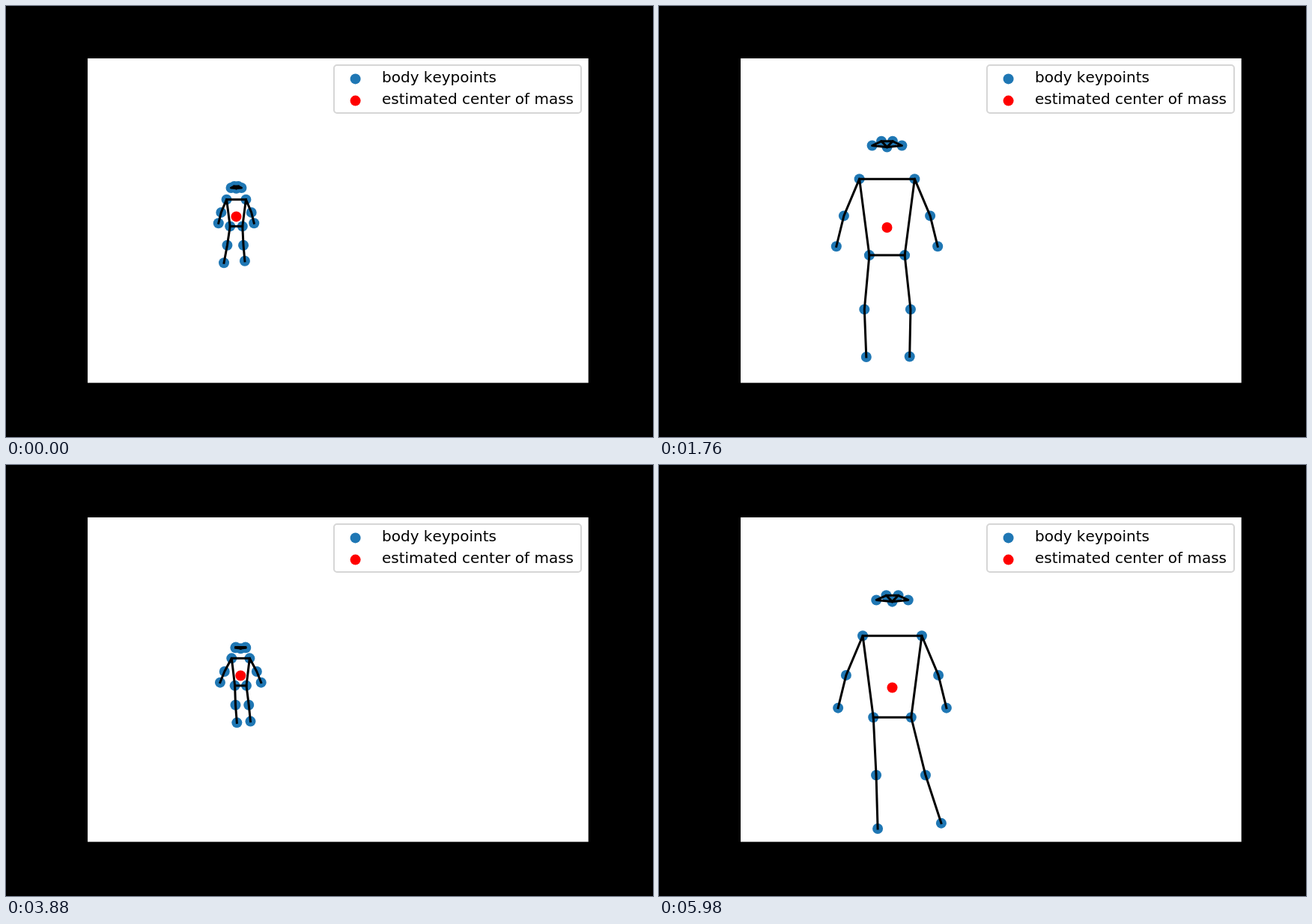
Write an HTML page with a canvas that moves like this. It is 864x576 px and loops after 6 s.

```html
<!DOCTYPE html>
<html lang="en">
<head>
<meta charset="utf-8">
<title>Body keypoints and center of mass</title>
<style>
  html, body { margin: 0; width: 100%; height: 100%; overflow: hidden; background: #000; }
  canvas { display: block; }
</style>
</head>
<body>
<canvas id="stage" width="864" height="576"></canvas>
<script>
const ctx = document.getElementById('stage').getContext('2d');
const LOOP = 6000, STEP = 20, GAIT = 1000;
const BLUE = '#1f77b4', RED = '#ff0000';

// The walk: time, center of mass x, body height.
const path = [
  [0, 307, 101], [660, 310, 145], [1760, 304, 288], [2200, 397, 283],
  [2540, 332, 225], [3140, 311, 149], [4050, 314, 99], [4640, 319, 125],
  [5580, 316, 233], [5790, 336, 272], [5980, 311, 308]
];

const mix = (a, b, u) => a + (b - a) * u;
const ease = (t, from, to) => {
  const u = Math.min(1, Math.max(0, (t - from) / (to - from)));
  return u * u * (3 - 2 * u);
};

function slope(i, k) {
  const a = path[Math.max(0, i - 1)], b = path[Math.min(path.length - 1, i + 1)];
  return (b[k] - a[k]) / (b[0] - a[0]);
}

function bodyAt(t) {
  let i = 0;
  while (i < path.length - 2 && t >= path[i + 1][0]) i++;
  const a = path[i], b = path[i + 1], d = b[0] - a[0], u = (t - a[0]) / d;
  const value = (k) => mix(a[k], b[k], u * u * (3 - 2 * u)) +
    d * u * (1 - u) * ((1 - u) * slope(i, k) - u * slope(i + 1, k));
  const h = value(2);
  return { x: value(1) + 0.5, y: 273.5 + 0.078 * h, h };
}

// Joints around the center of mass, measured in body heights.
function jointsAt(t, body) {
  const front = 1 - ease(t, 1950, 2330) + ease(t, 3850, 4250);
  const facing = 2 * front - 1;
  const profile = Math.sqrt(1 - facing * facing);
  const swing = Math.cos(2 * Math.PI * t / GAIT);
  const lean = mix(-0.025, 0.075, t / LOOP);

  const place = (x, y) => [body.x + x * body.h, body.y + y * body.h];
  // reach spreads the limbs fore and aft when seen from the side
  const half = (side) => {
    const joint = (x, y, reach = 0, shift = 0) =>
      place(side * (x * facing + reach * profile) + shift, y);
    return {
      ear: joint(0.069, mix(-0.36, -0.38, front)),
      eye: joint(mix(0.065, 0.026, front), mix(-0.368, -0.4, front)),
      shoulder: joint(0.128, -0.225, 0.03),
      elbow: joint(0.2, -0.054, -0.06),
      wrist: joint(0.235, 0.088, -0.15),
      hip: joint(0.082, 0.129, 0.02),
      knee: joint(0.107, 0.38, 0.07, lean / 2),
      ankle: joint(0.098 + 0.04 * swing, 0.6 - side * facing * 0.012 * swing, 0.14, lean)
    };
  };
  return { nose: place(0, mix(-0.352, -0.373, front)), sides: [half(-1), half(1)] };
}

function dot(x, y, color) {
  ctx.fillStyle = color;
  ctx.beginPath();
  ctx.arc(x, y, 7, 0, 2 * Math.PI);
  ctx.fill();
}

function line(...points) {
  ctx.beginPath();
  points.forEach((p) => ctx.lineTo(...p));
  ctx.stroke();
}

function drawBody(t) {
  const body = bodyAt(t);
  const { nose, sides } = jointsAt(t, body);
  const [left, right] = sides;

  [nose, ...sides.flatMap(Object.values)].forEach(([x, y]) => dot(x, y, BLUE));
  dot(body.x, body.y, RED);

  ctx.strokeStyle = '#000';
  ctx.lineWidth = 3;
  ctx.lineCap = 'square';
  ctx.lineJoin = 'round';
  for (const part of ['eye', 'shoulder', 'hip']) line(left[part], right[part]);
  for (const s of sides) {
    line(nose, s.eye, s.ear, nose);
    line(s.wrist, s.elbow, s.shoulder, s.hip, s.knee, s.ankle);
  }
}

function drawLegend() {
  ctx.strokeStyle = '#d6d6d6';
  ctx.lineWidth = 2;
  ctx.beginPath();
  ctx.roundRect(438, 79, 330, 64, 4);
  ctx.stroke();
  ctx.font = '20px "DejaVu Sans", sans-serif';
  ctx.fontKerning = 'none';
  [['body keypoints', BLUE], ['estimated center of mass', RED]].forEach(([label, color], i) => {
    dot(466.6, 97.4 + 29.2 * i, color);
    ctx.fillStyle = '#000';
    ctx.fillText(label, 502, 102 + 29 * i);
  });
}

function draw(t) {
  ctx.fillStyle = '#000';
  ctx.fillRect(0, 0, 864, 576);
  ctx.fillStyle = '#fff';
  ctx.fillRect(109, 70, 668.7, 433.6);
  drawBody(t);
  drawLegend();
}

const start = performance.now();
function tick() {
  const t = (performance.now() - start) % LOOP;
  draw(Math.floor(t / STEP) * STEP);
  requestAnimationFrame(tick);
}
tick();
</script>
</body>
</html>
```
